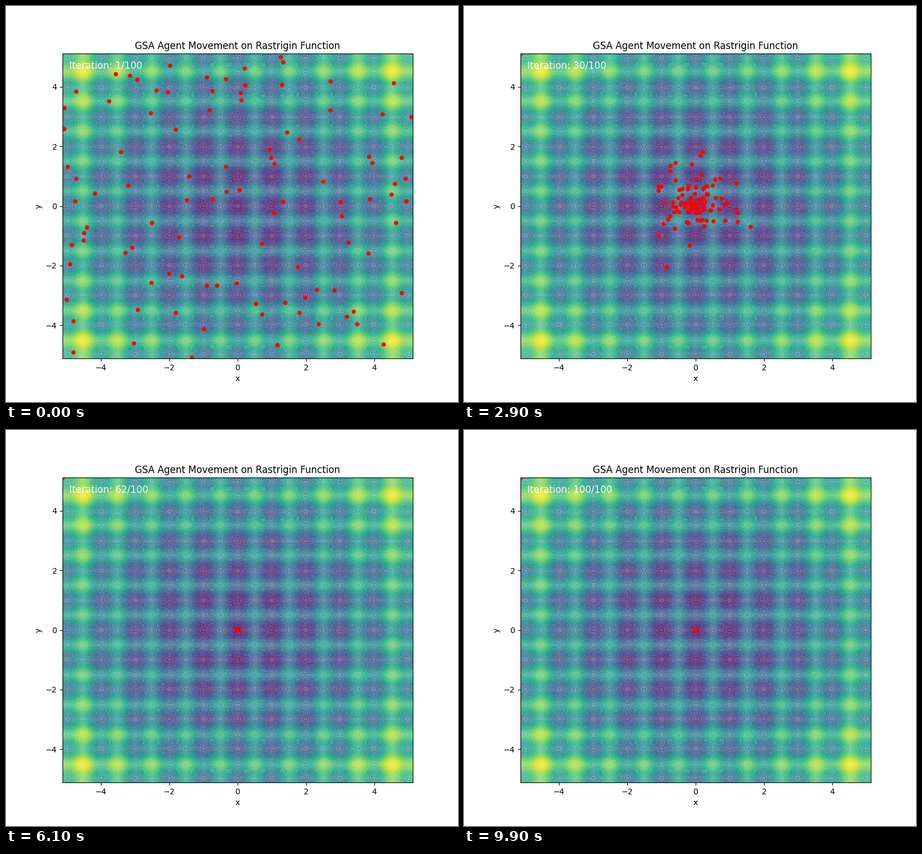
Recreate the animation shown at these times as a matplotlib script. Size 800 px wide and 700 px high, loop 10000 ms.

```python
import numpy as np
import matplotlib.pyplot as plt
from matplotlib.animation import FuncAnimation

LIM = 5.12
STEPS = 100
AGENTS = 100


def spread(step):
    """Width of the swarm: it shrinks exponentially, then collapses."""
    if step > 66:
        return 0.0
    steps = [1, 15, 23, 29, 49, 66]
    widths = [25, 10, 1.4, 0.5, 0.04, 0.002]
    return np.exp(np.interp(step, steps, np.log(widths)))


def make_tracks():
    rng = np.random.default_rng(7)
    tracks = np.empty((STEPS, AGENTS, 2))
    tracks[0] = rng.uniform(-LIM, LIM, (AGENTS, 2))

    # Some agents swing wider than others, which gives the crowd its stragglers.
    reach = np.geomspace(2.2, 0.4, AGENTS)[:, None]
    swing = rng.normal(size=(AGENTS, 2))
    for step in range(1, STEPS):
        # Agents overshoot the centre, so each swing tends to flip sides.
        swing = -0.5 * swing + 0.866 * rng.normal(size=(AGENTS, 2))
        tracks[step] = np.clip(spread(step) * reach * swing, -LIM, LIM)

    # The worst agent has no mass and stays stuck in a corner.
    tracks[16:27, 0] = LIM, LIM
    tracks[27:, 0] = -LIM, LIM
    return tracks


def rastrigin(x, y):
    return 20 + x**2 + y**2 - 10 * (np.cos(2 * np.pi * x) + np.cos(2 * np.pi * y))


tracks = make_tracks()

fig, ax = plt.subplots(figsize=(8, 7), dpi=100)
grid = np.linspace(-LIM, LIM, 200)
X, Y = np.meshgrid(grid, grid)
ax.contourf(X, Y, rastrigin(X, Y), levels=50, cmap="viridis", alpha=0.7)
agents = ax.scatter(*tracks[0].T, c="red", s=20)
label = ax.text(0.02, 0.95, "", transform=ax.transAxes, fontsize=12, color="white")
ax.set(xlim=(-LIM, LIM), ylim=(-LIM, LIM), xlabel="x", ylabel="y",
       title="GSA Agent Movement on Rastrigin Function")


def update(step):
    agents.set_offsets(tracks[step])
    label.set_text(f"Iteration: {step + 1}/{STEPS}")
    return agents, label


anim = FuncAnimation(fig, update, frames=STEPS, interval=100, repeat=True)
plt.show()
```
